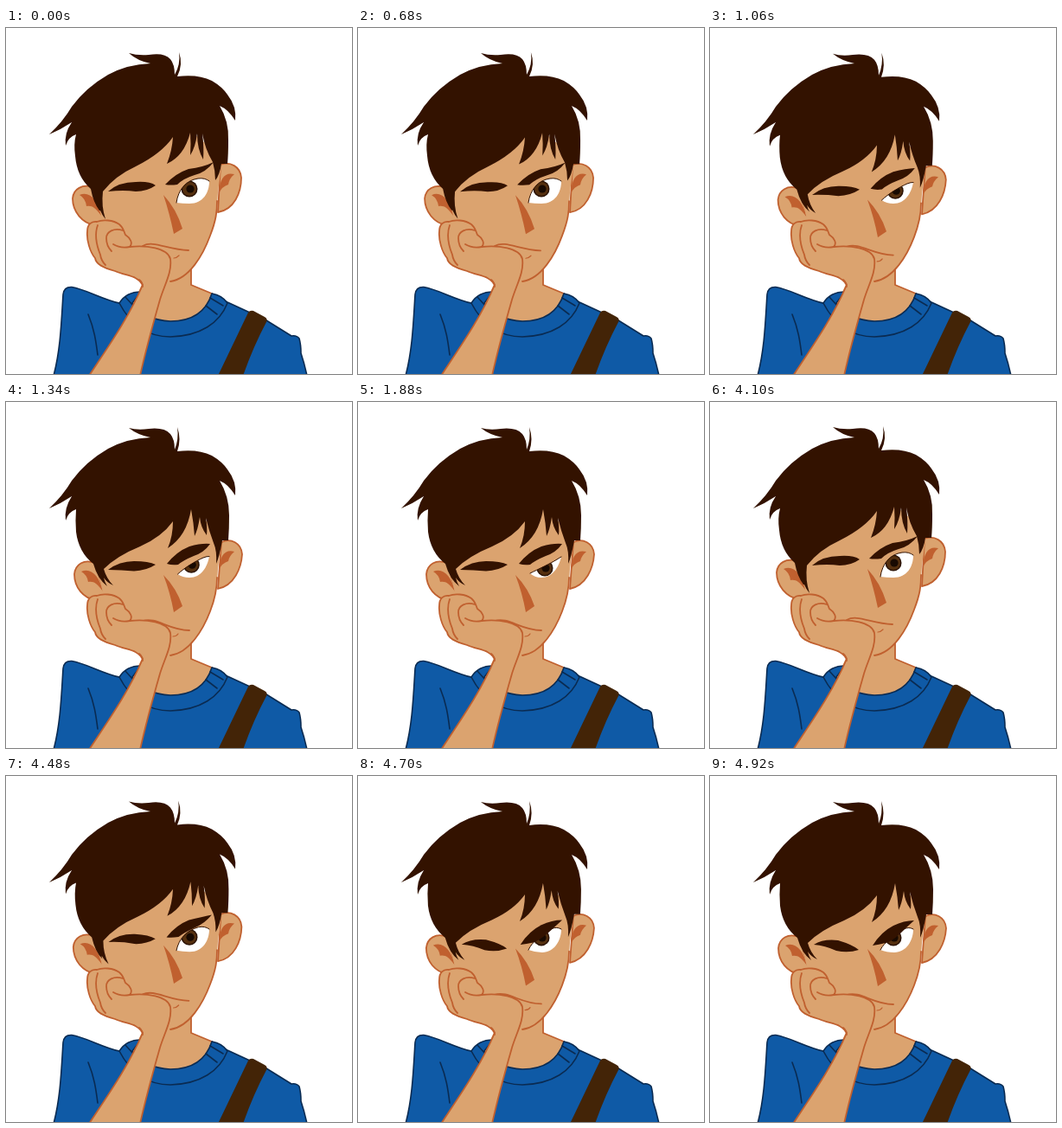
An HTML page that plays this animation: 400 by 400 pixels, repeating every 5.1 s.

```html
<!DOCTYPE html>
<html lang="en">
<head>
<meta charset="utf-8">
<title>Thinking</title>
<style>
html, body { margin: 0; width: 100%; height: 100%; overflow: hidden; background: #fff; }
svg { display: block; width: 100vw; height: 100vh; }
.skin { fill: #dba36f; }
.edge { stroke: #c0602f; stroke-width: 1.8; stroke-linecap: round; stroke-linejoin: round; }
.thin { stroke-width: 1.2; }
.line { fill: none; }
.rust { fill: #c0602f; }
.hair { fill: #331200; }
.shirt { fill: #0f5aa6; }
.seam { stroke: #0a2b52; stroke-width: 1.6; stroke-linecap: round; stroke-linejoin: round; }
</style>
</head>
<body>
<svg viewBox="0 0 400 400">
  <defs><clipPath id="lids"><path data-part="eye"/></clipPath></defs>

  <g id="body">
    <path class="shirt seam" d="M55 402C63 372 64 340 66 308Q67 299 76 299.500C92 302 112 314 131 318L190 345L238 307L256 317L282 329L301 338L330 356Q336 355 339 359Q341 366 341 376Q345 388 348 402Z"/>
    <path class="line seam thin" d="M95 331C102 348 104 362 106 378"/>
    <path class="skin" d="M166 284L214 278V297L238 307C231 328 215 339 190 339C170 338 155 330 147 318L160 290Z"/>
    <path class="line edge" d="M214 279V297L238 307"/>
    <path class="shirt seam" d="M131 318C144 343 163 357 190 357C225 356 247 341 256 318Q250 309 238 307C231 329 215 339 190 339C170 338 155 330 146 318L156 305Q139 305 131 318Z"/>
    <path class="line seam thin" d="M236 312L251 321M231 321L244 331M138 311L148 322"/>
    <path d="M280 329Q282 326 286 327L299 334Q303 336 301 340Q286 368 274 402H245Z" fill="#432407"/>
  </g>

  <g id="head">
    <path class="skin edge" data-part="earL"/>
    <path class="rust" data-part="earLIn"/>
    <path class="skin edge" data-part="earR"/>
    <path class="rust" data-part="earRIn"/>
    <path class="skin" data-part="face"/>
    <path class="line edge" data-part="jaw"/>
    <path class="rust" data-part="nose"/>
    <path class="line edge" data-part="mouth"/>
    <path class="line edge thin" data-part="chin"/>
    <path data-part="eye" fill="#fff"/>
    <g clip-path="url(#lids)">
      <g id="iris">
        <circle r="9.500" fill="#2b1305"/>
        <circle r="8" fill="#55300f"/>
        <circle cx="1" r="4.600" fill="#180a02"/>
      </g>
    </g>
    <path class="line" data-part="lid" stroke="#331200" stroke-linecap="round"/>
    <path class="hair" data-part="hair"/>
    <path class="hair" data-part="browL"/>
    <path class="hair" data-part="browR"/>
  </g>

  <g id="arm">
    <path class="skin edge" d="M158 297C152 286 140 287 126 281C112 277 104 273 103 266C97 259 93 245 94 235C94 227 99 223 105 224C112 221 124 222 131 227C136 231 136 235 138 239C144 243 147 249 143 253C162 251 187 254 190 267C192 282 184 295 178 314C170 342 162 370 155 402H96C117 370 142 335 158 297Z"/>
    <path class="line edge" d="M106 228C102 239 105 252 109 262Q110 269 115 274M135 234C125 231 116 235 116 243C116 249 119 255 122 258M143 253Q132 255 124 250M154 291Q158 294 158 299"/>
  </g>
</svg>
<script>
const LOOP = 5100;

// Each part: relaxed pose, squinting pose, optional glaring pose.
const poses = {
  hair: [
    "M142 29Q152 32 165 31Q183 28 190 36Q195 42 195 54Q202 42 200 28Q205 42 198 56Q222 53 238 61Q250 68 256 77Q267 91 265 107Q257 94 247 90Q258 108 257 130Q257 146 256 157L249 157Q247 170 242 176Q242 165 239 155Q230 140 227 122Q229 138 228 152Q221 140 221 122Q219 138 213 147Q214 134 213 121Q206 148 186 157Q192 142 193 126Q180 145 150 160Q126 171 112 189Q110 206 115 221Q111 216 109 211Q108 211 108 211Q101 202 98 186Q82 172 80 148Q78 134 81 123Q72 126 69 136Q67 122 76 109Q64 117 50 123Q66 108 76 91Q92 69 118 54Q140 42 167 41Q152 38 142 29Z",
    "M142 30Q152 33 165 31Q183 29 190 37Q195 43 195 55Q200 43 198 29Q203 43 198 57Q222 54 238 62Q250 69 256 78Q267 92 265 108Q257 95 247 91Q258 109 258 131Q258 147 257 160L250 160Q247 178 243 187Q244 172 240 163Q235 150 231 134Q233 146 232 154Q225 145 224 133Q222 147 218 155Q217 140 214 124Q209 155 187 169Q193 155 193 138Q180 156 155 167Q128 178 113 193Q116 204 124 212Q117 209 113 203Q114 208 117 213Q106 205 101 187Q84 174 81 150Q80 136 81 124Q72 127 69 137Q67 123 76 109Q64 117 50 123Q66 108 76 91Q92 69 118 54Q140 42 167 41Q152 38 142 30Z"
  ],
  earL: [
    "M101 184C88 180 78 186 77 197C77 212 88 226 103 228L114 222Z",
    "M103 186C90 181 80 188 79 199C79 214 89 227 104 229L115 224Z"
  ],
  earLIn: [
    "M85 193C96 188 106 198 110 217C103 207 99 205 93 206Q92 197 85 193Z",
    "M87 196C98 191 108 201 112 219C105 209 101 207 95 208Q94 200 87 196Z"
  ],
  earR: [
    "M248 158C259 154 271 160 272 173C272 190 264 210 245 213Z",
    "M249 162C260 157 272 163 273 176C272 192 264 212 245 216Z"
  ],
  earRIn: [
    "M264 169C253 166 247 174 246 191Q250 183 257 181Q258 174 264 169Z",
    "M264 173C253 170 247 178 246 194Q250 186 257 184Q258 178 264 173Z"
  ],
  face: [
    "M102 182L112 223L130 240L178 291Q183 294 190 293C212 290 228 262 236 240C243 222 244 208 245 190L250 150L180 90Z",
    "M104 185L113 225L130 240L178 291Q183 294 190 293C212 290 228 263 236 242C243 224 244 210 245 193L250 154L180 92Z"
  ],
  jaw: [
    "M190 293C212 290 228 262 236 240C243 222 244 212 244 200",
    "M190 293C212 290 228 263 236 242C243 224 244 214 244 203"
  ],
  nose: ["M182 193Q197 209 204 232L194 238Q189 214 182 193Z", "M182 200Q197 215 204 236L194 243Q190 221 182 200Z"],
  mouth: ["M158 252C170 245 186 256 211 257", "M158 253C174 248 188 264 212 264"],
  chin: ["M194 266Q197 266 200 263", "M193 271Q197 271 199 268"],
  browL: [
    "M118 189Q130 178 150 178Q166 177 173 182Q163 189 150 189Q136 187 118 189Z",
    "M118 194Q131 184 148 184Q165 184 173 188Q162 195 148 195.500Q134 194 118 194Z",
    "M120 195Q131 188 148 190Q165 195 172 201Q160 205 146 202Q133 196 120 195Z"
  ],
  browR: [
    "M184 181Q196 168 211 163Q228 161 240 155Q231 167 218 170Q205 174 198 181Q190 182 184 181Z",
    "M186 187Q197 173 212 167Q226 163 236 164Q229 174 217 178Q205 183 199 188Q192 189 186 187Z",
    "M188 196Q198 180 212 173Q224 167 236 167Q228 174 219 183Q209 192 203 193Q195 195 188 196Z"
  ],
  eye: [
    "M197 202C199 187 208 176 222 174Q230 173 235 177C235 190 228 203 212 203Q204 203 197 202Z",
    "M199 198C209 193 222 187 230 182Q233 180 235 179C232 191 225 203 212 203Q204 203 199 198Z",
    "M197 201C202 191 212 186 224 177Q230 174 235 177C235 190 227 204 213 204Q204 204 197 201Z"
  ],
  lid: [
    "M197 202C199 187 208 176 222 174Q230 173 235 177",
    "M199 198C209 193 222 187 230 182Q233 180 235 179",
    "M197 201C202 191 212 186 224 177Q230 174 235 177"
  ]
};

const nums = d => d.match(/[\d.]+/g).map(Number);
const parts = [...document.querySelectorAll("[data-part]")].map(el => {
  const name = el.dataset.part, set = poses[name];
  return { el, name, shape: set[0].split(/[\d.]+/), set: set.map(nums) };
});
const iris = document.getElementById("iris");

const clamp = x => Math.min(1, Math.max(0, x));
const ease = x => x < .5 ? 4 * x ** 3 : 1 - 4 * (1 - x) ** 3;
const ramp = (t, from, to) => ease(clamp((t - from) / (to - from)));
const mix = (a, b, k) => a + (b - a) * k;

function draw(t) {
  const back = 1 - ramp(t, 2360, 2560);
  const again = ramp(t, 4100, 4920);
  const head = t < 4100 ? ramp(t, 460, 1420) * back : again;
  const glance = ramp(t, 1760, 1880) * back;
  const squint = mix(.75 * ramp(t, 800, 1090) * back, back, glance);
  const glare = ramp(t, 4200, 4920);

  for (const { el, name, shape, set: [a, b, c] } of parts) {
    const k = name === "eye" || name === "lid" ? squint : head;
    let d = shape[0];
    a.forEach((v, i) => {
      let n = mix(v, b[i], k);
      if (c) n = mix(n, c[i], glare);
      d += n.toFixed(2) + shape[i + 1];
    });
    el.setAttribute("d", d);
  }
  const x = 212 + 3 * squint + glance;
  const y = 186 + 3 * squint + 3 * glance + glare;
  iris.setAttribute("transform", `translate(${x} ${y})`);
}

const start = performance.now();
function tick() {
  draw((performance.now() - start) % LOOP);
  requestAnimationFrame(tick);
}
tick();
</script>
</body>
</html>
```
